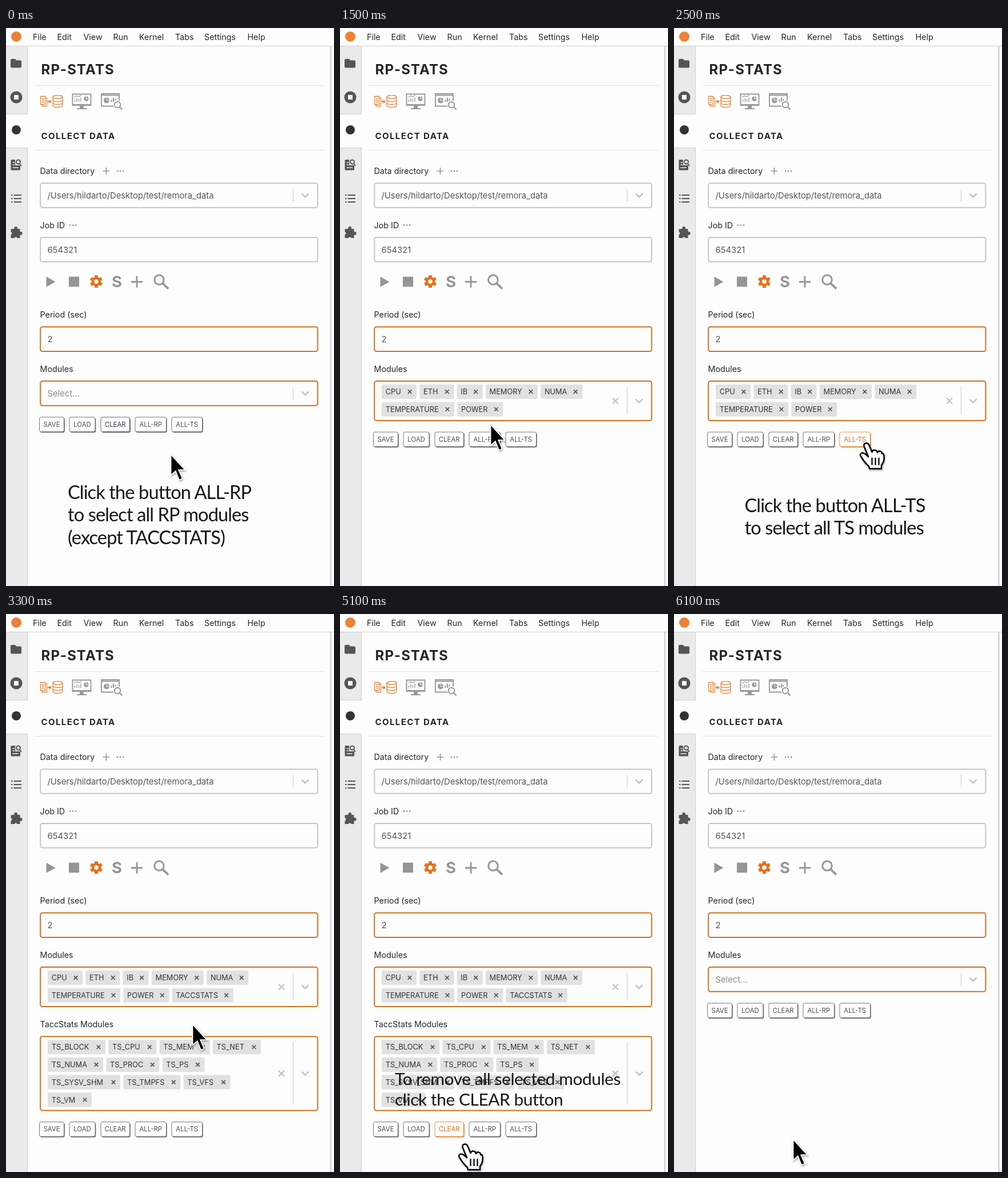
These frames come from a looping animation (574 px wide and 975 px high, 7.1 s). An HTML page:

```html
<!DOCTYPE html>
<html lang="en">
<head>
<meta charset="utf-8">
<title>Module selection</title>
<style>
  html, body { margin: 0; width: 100%; height: 100%; overflow: hidden; background: #fdfdfd; }
  svg { display: block; }
  text { font-family: Inter, Roboto, sans-serif; font-size: 14.3px; fill: #262626; white-space: pre; }
  .field { font-size: 14.8px; fill: #555; }
  .hint { fill: #8c8c8c; }
  .tag { font-size: 12.8px; fill: #333; }
  .btn text { font-size: 11.4px; fill: currentColor; text-anchor: middle; }
  .caption text { font-family: Lato, Carlito, sans-serif; font-size: 32.6px; letter-spacing: -.9px; fill: #151515; }
  .caption.small text { font-size: 29.8px; letter-spacing: -.4px; }
  .line { fill: none; stroke: #999; }
  #cursor { filter: drop-shadow(1px 2px 1.5px #0005); }
</style>
</head>
<body>
<svg width="574" height="975" viewBox="0 0 574 975">
  <!-- frame and sidebar -->
  <rect width="574" height="975" fill="#fdfdfd"/>
  <rect y="31" width="37" height="944" fill="#ebeaeb"/>
  <path d="M0 31.5H574M37.5 31V150.5H0M0 209.5H37.5V975" fill="none" stroke="#cfcfcf"/>
  <rect y="151" width="38" height="58" fill="#fdfdfd"/>
  <path d="M568.5 32V975" stroke="#bdbdbd" stroke-width="1.5"/>
  <path d="M50 100.5H557M50 213.5H557" stroke="#e2e2e2"/>
  <circle cx="18" cy="15" r="9" fill="#ee8136"/>
  <g id="menu"></g>

  <g fill="#555">
    <path d="M10 54H16L18 56.500H25Q27 56.500 27 58.500V67.500Q27 69.500 25 69.500H10Q8 69.500 8 67.500V56Q8 54 10 54Z"/>
    <circle cx="18" cy="121" r="10.500"/>
    <rect x="14" y="117" width="8" height="8" rx="1" fill="#fff"/>
    <circle cx="18" cy="178" r="8" fill="#333"/>
    <path d="M10 230H16V240H25V247Q25 248.500 23.500 248.500H10Q8.500 248.500 8.500 247V231.500Q8.500 230 10 230Z"/>
    <path d="M11.500 235H15M11.500 239H15M11.500 244H22" stroke="#ebeaeb" stroke-width="1.500"/>
    <path d="M24 237L27 241" stroke="#555" stroke-width="2"/>
    <circle cx="21.500" cy="234" r="3.500" fill="#ebeaeb" stroke="#555" stroke-width="2"/>
    <path d="M9 292H11.500M9 298H11.500M9 304H11.500M13.500 292H27M13.500 298H27M13.500 304H27" stroke="#555" stroke-width="2"/>
    <path d="M10 351H14.500A3 3 0 1 1 20 351H24.500V356A3 3 0 1 1 24.500 361.500V367H20A3 3 0 0 0 14.500 367H8.500V361.500A3 3 0 0 0 8.500 356V352.500Q8.500 351 10 351Z"/>
  </g>

  <!-- page tabs -->
  <g fill="none" stroke="#e08a3f" stroke-width="1.300">
    <path d="M60.500 119.500H68.500V133.500H60.500ZM63 133.500V136.500H71.500V122H68.500M62.500 123.500H66.500M62.500 126.500H66.500M62.500 129.500H66.500"/>
    <path d="M73 128.500H76.500" stroke-width="2.500"/>
    <path d="M76 125L80 128.500L76 132Z" fill="#e08a3f" stroke="none"/>
    <ellipse cx="90.500" cy="120.500" rx="8.500" ry="2.800"/>
    <path d="M82 120.500V135.500C82 139.500 99 139.500 99 135.500V120.500M82 125.500C82 129.500 99 129.500 99 125.500M82 130.500C82 134.500 99 134.500 99 130.500"/>
  </g>
  <g fill="none" stroke="#999" stroke-width="1.900">
    <path d="M116.500 115.500H148.500V135H116.500ZM116 134H149"/>
    <path d="M129 136H136V140H141V142H124V140H129Z" fill="#999" stroke="none"/>
    <path d="M120.500 129V125M124 129V122.500M127.500 129V124M131 129V121M119.500 121L124 118.500L127.500 120L131.500 117.500" stroke-width="1.300"/>
    <circle cx="140.500" cy="123.500" r="4.300" fill="#999" stroke="none"/>
    <path d="M140.500 123.500V119M140.500 123.500H145" stroke="#fff" stroke-width="1"/>
    <path d="M188 136.500H167V115H198V127M167 117.500H198"/>
    <circle cx="176" cy="126.500" r="5" fill="#999" stroke="none"/>
    <path d="M176 126.500V121.500M176 126.500H181" stroke="#fff" stroke-width="1"/>
    <path d="M184.500 129V125M188 129V121.500M191.500 127V123.500" stroke-width="2"/>
    <circle cx="195" cy="134" r="5.300" fill="#fdfdfd"/>
    <path d="M199 138L203.500 142.500" stroke-width="2.300"/>
  </g>

  <!-- form labels and tools -->
  <g id="labels"></g>
  <path class="line" stroke-width="1.700" d="M169.500 250H181.500M175.500 244V256"/>
  <g id="dots" fill="#888"></g>
  <g fill="#959595">
    <path d="M70.500 434.500L86.500 443.500L70.500 452.500Z"/>
    <rect x="110" y="434.500" width="18" height="17.500"/>
    <g id="gear" transform="translate(158 443)" fill="#e4721b"></g>
    <path class="line" stroke-width="3" d="M219 443.500H239M229 433.500V453.500"/>
    <circle class="line" stroke-width="3" cx="268" cy="440" r="8.300"/>
    <path class="line" stroke-width="3.800" d="M274 446L284 455.500"/>
  </g>
  <g id="form"></g>
  <g id="empty"></g>
  <g id="modules"></g>
  <g id="stats"></g>
  <g id="buttons"></g>

  <g id="captions"></g>
  <g id="cursor">
    <path id="arrow" d="M.5 1V37.500L8.800 30.200L14.500 44.500Q15.200 46 16.700 45.300L19.500 44Q20.700 43.300 20.200 42L14.200 28.200H25.500Z" fill="#000" stroke="#fff" stroke-width="1.800"/>
    <g id="hand" stroke="#000" stroke-linecap="round" stroke-linejoin="round">
      <path d="M14 33L7 16Q5 10.500 9.500 9.500Q13.500 8.500 16 14L20.500 25Q22 20 27 22Q29.500 23 30 26Q32 22 36 24Q38 25 38 28Q41 26 41.500 32Q42.500 41 37 48V54H16L15 50Q8 44 2 34Q-2 29 2 27Q6 25 14 33Z" fill="#fff" stroke-width="2.500"/>
      <path d="M20.500 35.500V47M26.500 35.500V47M32.500 35.500V47" stroke-width="2.200"/>
    </g>
  </g>
</svg>

<script>
const NS = 'http://www.w3.org/2000/svg';
const $ = id => document.getElementById(id);
const ORANGE = '#d0731f', GRAY = '#c6c6c9';

function add(parent, tag, attrs = {}, label) {
  const el = document.createElementNS(NS, tag);
  for (const k in attrs) el.setAttribute(k, attrs[k]);
  if (label !== undefined) el.textContent = label;
  return parent.appendChild(el);
}
const write = (parent, x, y, label, attrs = {}) => add(parent, 'text', { x, y, ...attrs }, label);
const stroke = (parent, d, color, width) =>
  add(parent, 'path', { d, fill: 'none', stroke: color, 'stroke-width': width });
const cross = (parent, x, y, r, color, width) =>
  stroke(parent, `M${x - r} ${y - r}l${2 * r} ${2 * r}m0 ${-2 * r}l${-2 * r} ${2 * r}`, color, width);

function box(parent, top, bottom, color) {
  add(parent, 'rect', { x: 60.2, y: top, width: 485.2, height: bottom - top, rx: 3.5,
    fill: '#fdfdfd', stroke: color, 'stroke-width': 2 });
}
function dropdown(parent, top, bottom, color) {
  box(parent, top, bottom, color);
  const mid = (top + bottom) / 2;
  stroke(parent, `M502.500 ${top + 10}V${bottom - 10}`, '#ccc', 1);
  stroke(parent, `M517.500 ${mid - 3}l6 6l6 -6`, '#c4c4c4', 2.5);
}

// Each tag is a label and its width; rows wrap as given.
function tagBox(parent, top, bottom, rows) {
  dropdown(parent, top, bottom, ORANGE);
  cross(parent, 482, (top + bottom) / 2, 5, '#c4c4c4', 2.2);
  const tags = [];
  rows.forEach((row, i) => {
    let x = 73;
    const y = top + 6 + i * 30.7;
    for (const [label, width] of row) {
      const g = add(parent, 'g');
      add(g, 'rect', { x, y, width, height: 25, rx: 2, fill: '#e1e1e1' });
      write(g, x + 6.7, y + 17.2, label, { class: 'tag' });
      cross(g, x + width - 12, y + 12.5, 3.3, '#555', 1.7);
      tags.push(g);
      x += width + 5.3;
    }
  });
  return tags;
}

[['File', 47], ['Edit', 89.5], ['View', 135.5], ['Run', 187.5], ['Kernel', 233], ['Tabs', 296],
 ['Settings', 347], ['Help', 422.5]].forEach(([s, x]) => write($('menu'), x, 21, s));

const labels = $('labels');
write(labels, 61.5, 80.5, 'RP-STATS', { style: 'font-size:24px;font-weight:700;letter-spacing:1.2px' });
write(labels, 61.5, 194, 'COLLECT DATA', { style: 'font-size:15px;font-weight:700;letter-spacing:1.4px' });
write(labels, 59.5, 255, 'Data directory');
write(labels, 59.5, 349.5, 'Job ID');
write(labels, 59.5, 506, 'Period (sec)');
write(labels, 59.5, 601, 'Modules');
write(labels, 185, 453, 'S', { style: 'font-size:27.5px;font-weight:700;fill:#959595' });

for (const [x, y] of [[200, 250], [117, 344.5]])
  for (const d of [-5, 0, 5]) add($('dots'), 'circle', { cx: x + d, cy: y, r: 1.3 });

for (let a = 0; a < 360; a += 60)
  add($('gear'), 'rect', { x: -3, y: -11, width: 6, height: 7, rx: 1, transform: `rotate(${a})` });
add($('gear'), 'circle', { r: 8.3 });
add($('gear'), 'circle', { r: 3.8, fill: '#fdfdfd' });

const form = $('form');
dropdown(form, 271.3, 313.7, GRAY);
write(form, 72.5, 298, '/Users/hildarto/Desktop/test/remora_data', { class: 'field' });
box(form, 366, 408.5, GRAY);
write(form, 72.5, 392.5, '654321', { class: 'field' });
box(form, 522.2, 565, ORANGE);
write(form, 72.5, 549, '2', { class: 'field' });

dropdown($('empty'), 617, 659.8, ORANGE);
write($('empty'), 72.5, 644, 'Select...', { class: 'field hint' });

const moduleTags = tagBox($('modules'), 617, 686, [
  [['CPU', 61], ['ETH', 60], ['IB', 45], ['MEMORY', 91], ['NUMA', 73]],
  [['TEMPERATURE', 127], ['POWER', 80], ['TACCSTATS', 107]]]);
const statsTag = moduleTags.at(-1);
write($('stats'), 59.5, 722, 'TaccStats Modules');
tagBox($('stats'), 738.2, 867.5, [
  [['TS_BLOCK', 101], ['TS_CPU', 84], ['TS_MEM', 88], ['TS_NET', 84]],
  [['TS_NUMA', 97], ['TS_PROC', 93], ['TS_PS', 74]],
  [['TS_SYSV_SHM', 127], ['TS_TMPFS', 100], ['TS_VFS', 82]],
  [['TS_VM', 77]]]);

const buttons = [['SAVE', 58.5, 43], ['LOAD', 111, 45], ['CLEAR', 166, 50.5],
  ['ALL-RP', 226, 54.5], ['ALL-TS', 290, 53.5]].map(([s, x, width]) => {
  const g = add($('buttons'), 'g', { class: 'btn' });
  const r = { width, height: 25.5, rx: 3 };
  add(g, 'rect', { ...r, x: x + 1.3, y: 681.5, fill: 'currentColor', opacity: .75 });
  add(g, 'rect', { ...r, x, y: 680, fill: '#fff', stroke: 'currentColor', 'stroke-opacity': .75 });
  write(g, x + width / 2, 696.8, s);
  return g;
});

const captions = [
  { from: 0, to: 800, x: 108, y: 823, step: 39.3,
    lines: ['Click the button ALL-RP', 'to select all RP modules', '(except TACCSTATS)'] },
  { from: 1800, to: 3200, x: 123.5, y: 845.5, step: 39.5,
    lines: ['Click the button ALL-TS', 'to select all TS modules'] },
  { from: 4100, to: 6000, x: 96, y: 822.5, step: 36.5, small: true,
    lines: ['To remove all selected modules', 'click the CLEAR button'] }
];
for (const c of captions) {
  c.el = add($('captions'), 'g', { class: c.small ? 'caption small' : 'caption' });
  c.lines.forEach((s, i) => write(c.el, c.x, c.y + i * c.step, s));
}

const LOOP = 7100, TICK = 100;
// Cursor stops: time, x, y
const path = [[0, 288, 744], [400, 288, 744], [1100, 263, 692], [1700, 263, 692], [2500, 326, 716],
  [4000, 326, 716], [4100, 275, 969], [4800, 208, 917], [6000, 208, 917], [LOOP, 208, 917]];
const hovers = [{ from: 900, to: 1500, button: 3 }, { from: 2300, to: 3300, button: 4 },
  { from: 4900, to: 6100, button: 2 }];

const during = (t, span) => t >= span.from && t < span.to;
const show = (el, on) => { el.style.display = on ? '' : 'none'; };
const clamp = v => Math.max(0, Math.min(1, v));

function cursorAt(t) {
  const i = path.findIndex((p, k) => t < path[k + 1][0]);
  const [t0, x0, y0] = path[i], [t1, x1, y1] = path[i + 1];
  const u = (t - t0) / (t1 - t0), e = u * u * (3 - 2 * u);
  return [x0 + (x1 - x0) * e, y0 + (y1 - y0) * e];
}

function draw(time) {
  const t = Math.floor((time % LOOP) / TICK) * TICK;
  const filled = t >= 1400 && t < 6000, withStats = t >= 3200 && t < 6000;
  show($('empty'), !filled);
  show($('modules'), filled);
  show(statsTag, withStats);
  show($('stats'), withStats);
  $('buttons').setAttribute('transform', `translate(0 ${withStats ? 207.5 : filled ? 26 : 0})`);
  captions.forEach(c => show(c.el, during(t, c)));

  const hover = hovers.find(h => during(t, h));
  buttons.forEach((b, i) => {
    const glow = hover && hover.button === i ? clamp((t - hover.from + TICK) / 300) : 0;
    const focus = i === 2 ? clamp(1 - t / 200) : 0;
    b.style.color = focus ? `color-mix(in srgb, #30343f ${focus * 100}%, #4a4a4a)`
      : `color-mix(in srgb, #dc6811 ${glow * 100}%, #4a4a4a)`;
  });
  show($('hand'), hover);
  show($('arrow'), !hover);
  $('cursor').setAttribute('transform', `translate(${cursorAt(t)})`);
}

const start = performance.now();
function frame() {
  draw(performance.now() - start);
  requestAnimationFrame(frame);
}
frame();
</script>
</body>
</html>
```
